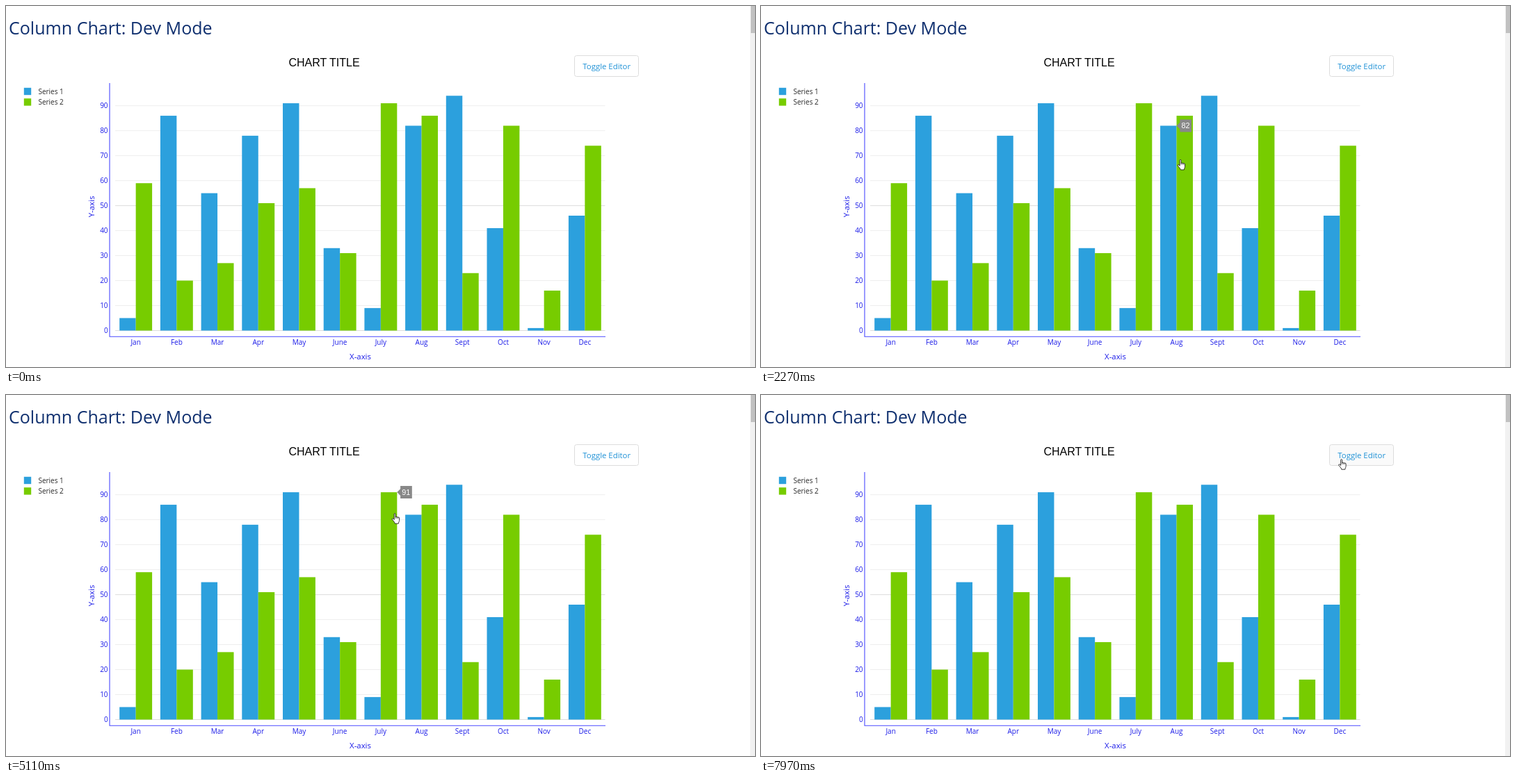
Recreate the animation shown at these times as an HTML page. Size 1077x520 px, loop 8000 ms.

```html
<!DOCTYPE html>
<html lang="en">
<head>
<meta charset="utf-8">
<title>Column Chart</title>
<style>
  html, body { margin: 0; width: 100%; height: 100%; overflow: hidden; background: #fff; }
  svg { display: block; width: 1077px; height: 520px; font: 10px "Open Sans", sans-serif; }
  .mid { text-anchor: middle; }
  .axis { fill: #1c1ce8; }
  .arial { font-family: "Liberation Sans", Arial, sans-serif; }
</style>
</head>
<body>
<svg viewBox="0 0 1077 520">
  <rect x="1070" width="7" height="520" fill="#f1f1f1"/>
  <rect x="1071" width="6" height="39" fill="#c1c1c1"/>
  <text x="4" y="41" font-size="25" fill="#10306f">Column Chart: Dev Mode</text>
  <text x="457.5" y="87" font-size="16" class="mid arial">CHART TITLE</text>
  <rect id="button" x="817.5" y="71.5" width="92" height="30" rx="3" fill="#fff" stroke="#ddd"/>
  <text x="863.7" y="90.7" font-size="11.4" class="mid" fill="#1e91d6">Toggle Editor</text>
  <g id="plot"></g>
  <path d="M149 111V476.3H862" fill="none" stroke="#4a4aff" stroke-width="1.1"/>
  <g class="axis mid" font-size="11.4">
    <text x="509.5" y="509">X-axis</text>
    <text transform="translate(127 289) rotate(-90)">Y-axis</text>
  </g>
  <g id="tip" opacity="0">
    <path d="M0 0L4.8-4.8V-9H21.5V9H4.8V4.8Z" fill="#888"/>
    <text x="13" y="3.9" font-size="10.8" fill="#fff" class="mid arial"></text>
  </g>
  <g id="cursor" fill="#fff" stroke="#111" stroke-width=".85" stroke-linejoin="round">
    <g id="hand">
      <path d="M3.6 9.5V1.7c0-1.5 2-1.5 2 0V6c0-1 1.9-1 1.9.2c0-.9 1.8-.8 1.8.3c0-.8 1.8-.6 1.8.6v3.4c0 1.5-1 2.5-1.3 4.7H4.8C4.4 13 1.9 11 .8 9.2c-.6-1 .6-2 1.6-1.1z"/>
      <path d="M5.6 6v2M7.5 6.3v1.7M9.3 6.6v1.4" fill="none" stroke-width=".6"/>
    </g>
    <path id="arrow" d="M4.5.5V13l2.9-2.6 1.9 4.4 1.8-.8-1.9-4.3h4z"/>
  </g>
</svg>
<script>
const LOOP = 8000, STEP = 80, DWELL = 140, REACH = 130, BAR = 23.45, BASE = 467.5;
const months = ["Jan", "Feb", "Mar", "Apr", "May", "June", "July", "Aug", "Sept", "Oct", "Nov", "Dec"];
const series = [
  { color: "#2ca0dd", values: [5, 86, 55, 78, 91, 33, 9, 82, 94, 41, 1, 46] },
  { color: "#77cc00", values: [59, 20, 27, 51, 57, 31, 91, 86, 23, 82, 16, 74] }
];
const $ = id => document.getElementById(id);
const valueY = v => BASE - v * 3.598;

function add(tag, attrs, text = "") {
  const el = document.createElementNS("http://www.w3.org/2000/svg", tag);
  for (const key in attrs) el.setAttribute(key, attrs[key]);
  el.textContent = text;
  return $("plot").appendChild(el);
}

// Grid, legend, bars and labels
for (let v = 0; v <= 90; v += 10) {
  const y = valueY(v);
  add("path", { d: `M157 ${y}H861.5`, stroke: v % 50 ? "#eee" : "#ddd" });
  add("text", { x: 146.6, y: y + 3.6, "text-anchor": "end", class: "axis" }, v);
}
const bars = series.flatMap(({ color, values }, s) => {
  const y = 117.8 + s * 15.4;
  add("rect", { x: 25.8, y, width: 10.4, height: 10.4, fill: color });
  add("text", { x: 46.4, y: y + 9.2, fill: "#2a2a2a" }, `Series ${s + 1}`);
  return values.map((value, m) => {
    const bar = { value, x: 163.2 + m * 58.7 + s * BAR, y: valueY(value) };
    add("rect", { x: bar.x, y: bar.y, width: BAR, height: BASE - bar.y, fill: color });
    return bar;
  });
});
months.forEach((name, m) => add("text", { x: 186.65 + m * 58.7, y: 488, class: "axis mid" }, name));

// Pointer strokes: first step, last step, end point
const strokes = [
  [300, 1050, 687, 317],
  [1110, 1360, 598, 246],
  [1440, 1740, 585, 220],
  [2110, 2350, 603, 221],
  [3000, 3230, 624, 219],
  [3300, 3550, 640, 217],
  [3970, 4330, 579, 179],
  [4430, 4690, 554.5, 170],
  [5430, 5430, 559, 172],
  [5700, 5860, 600, 202],
  [6790, 6980, 732.4, 158.4],
  [7060, 7530, 793, 118],
  [7630, 7970, 830, 92]
];

// Each stroke is walked in even steps about STEP ms apart.
const path = [{ t: 0, x: 1000, y: 529 }];
for (const [start, end, toX, toY] of strokes) {
  const from = path[path.length - 1];
  const gaps = Math.round((end - start) / STEP);
  for (let i = 0; i <= gaps; i++) {
    const k = (i + 1) / (gaps + 1);
    path.push({
      t: start + (end - start) * i / (gaps || 1),
      x: from.x + (toX - from.x) * k,
      y: from.y + (toY - from.y) * k
    });
  }
}

const fingerX = p => p.x + 5;
const barAt = p => bars.find(b => fingerX(p) >= b.x && fingerX(p) < b.x + BAR && p.y >= b.y && p.y < BASE);

// A label opens after the pointer rests on a bar, and closes once it is far away.
const labels = [{ t: 0 }];
let entered = 0, over, shown;
const show = (t, bar) => labels.push({ t, bar: shown = bar });
path.forEach((p, i) => {
  const bar = barAt(p);
  if (bar !== over) [over, entered] = [bar, p.t];
  const next = path[i + 1] ? path[i + 1].t : LOOP;
  const due = entered + DWELL;
  if (shown && Math.abs(fingerX(p) - shown.x - BAR) > REACH) show(p.t, undefined);
  else if (bar && bar !== shown && due <= next) show(due, bar);
});

const latest = (list, t) => list.reduce((found, item) => item.t <= t ? item : found);
const set = (id, key, value) => $(id).setAttribute(key, value);

function draw(t) {
  const p = latest(path, t);
  const { bar } = latest(labels, t);
  const inside = p.x < 858 && p.y < 476;
  set("cursor", "transform", `translate(${p.x} ${p.y})`);
  set("hand", "opacity", +inside);
  set("arrow", "opacity", +!inside);
  set("button", "fill", p.x > 813 && p.x < 910 && p.y < 102 ? "#fafafa" : "#fff");
  set("tip", "opacity", bar ? 1 : 0);
  if (bar) {
    set("tip", "transform", `translate(${bar.x + BAR} ${bar.y})`);
    $("tip").lastElementChild.textContent = bar.value;
  }
}

const began = performance.now();
function tick() {
  draw((performance.now() - began) % LOOP);
  requestAnimationFrame(tick);
}
tick();
</script>
</body>
</html>
```
